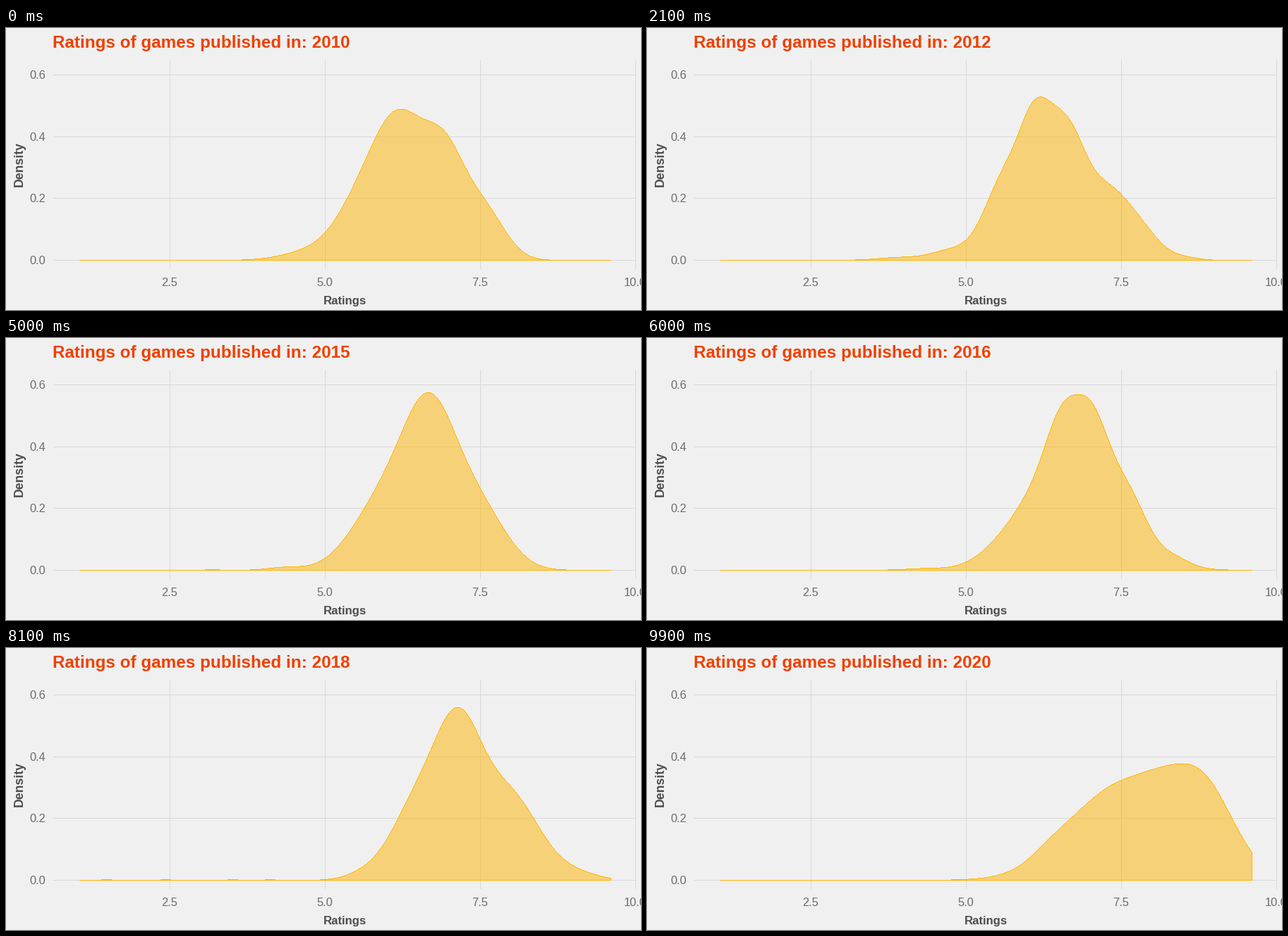
Animation, 900 px wide and 400 px high, one loop 10 s. Source, as a matplotlib script:

```python
import numpy as np
import matplotlib.pyplot as plt
from matplotlib.animation import FuncAnimation
from matplotlib.patches import Polygon

W, H, DPI = 900, 400, 100
FRAMES, INTERVAL = 100, 100
BG, GRID, AMBER = "#f0f0f0", "#d8d8d8", "#ffb400"
TITLE, TICK, LABEL = "#f04000", "#6c6c6c", "#4d4d4d"
ZERO, LEFT, RIGHT = 329, 104, 857
X = np.arange(LEFT, RIGHT + 1)


def bells(*parts):
    """Sum of normal bells, each (height, centre, spread) in pixels."""
    return sum(a * np.exp(-((X - c) / s) ** 2 / 2) for a, c, s in parts)


# Density curves and the frames at which they stand
KEYS = {
    0: bells((199, 556, 40), (122, 624, 29), (63, 679, 29), (47, 492, 33),
             (12, 430, 38)),
    21: bells((160, 550, 23), (160, 594, 26), (108, 505, 28), (96, 655, 34),
              (20, 708, 24), (14, 432, 28), (4, 360, 32), (4, 760, 20)),
    34: bells((205, 594, 46), (92, 519, 40), (43, 690, 36), (9, 430, 28),
              (1.6, 335, 29)),
    50: bells((210, 601, 38), (92, 533, 44), (78, 672, 38), (4, 395, 24),
              (0.8, 292, 9.8)),
    70: bells((150, 616, 65), (115, 632, 23), (70, 585, 20), (50, 686, 21),
              (14, 752, 20), (0.8, 365, 37)),
    81: bells((178, 640, 32), (122, 710, 45), (105, 582, 37), (7, 815, 28),
              (7, 505, 25), *[(0.77, x, 7) for x in (142, 226, 321, 374)]),
    89: bells((180, 660, 48), (90, 752, 42), (30, 570, 35)),
    99: bells((134, 672, 72), (115, 787, 45), (13, 722, 30), (10, 572, 28)),
}
TIMES = list(KEYS)


def heights(i):
    k = min(np.searchsorted(TIMES, i, side="right"), len(TIMES) - 1)
    t0, t1 = TIMES[k - 1], TIMES[k]
    return KEYS[t0] + (KEYS[t1] - KEYS[t0]) * (i - t0) / (t1 - t0)


def columns(top, bottom):
    """Outline of one-pixel columns running from top to bottom."""
    xs = np.repeat(np.r_[X, RIGHT + 1], 2)[1:-1]
    ys = np.r_[np.repeat(top, 2), np.repeat(bottom, 2)[::-1]]
    return np.c_[np.r_[xs, xs[::-1]], ys]


fig = plt.figure(figsize=(W / DPI, H / DPI), dpi=DPI, facecolor=BG)
ax = fig.add_axes([0, 0, 1, 1])
ax.set_xlim(0, W)
ax.set_ylim(H, 0)
ax.axis("off")


def stroke(xs, ys, color, z):
    ax.plot(xs, ys, color=color, lw=72 / DPI, snap=False,
            solid_capstyle="butt", zorder=z)


def shape(z, **kw):
    return ax.add_patch(Polygon([(0, 0), (1, 1), (2, 0)], facecolor=AMBER,
                                edgecolor="none", snap=False, zorder=z, **kw))


def label(x, y, s, px, color, **kw):
    return ax.text(x, y, s, fontsize=px * 72 / DPI, color=color,
                   family="Liberation Sans", va="baseline", **kw)


for n, y in enumerate((329, 241, 154, 66)):
    stroke([67, 893], [y + 0.5] * 2, GRID, 1)
    label(56, y + 6, f"{n * 0.2:.1f}", 16.4, TICK, ha="right")
for n in range(4):
    x = 232 + 220 * n
    stroke([x + 0.5] * 2, [45, 342], GRID, 1)
    label(x, 366, f"{2.5 * (n + 1):.1f}", 16.4, TICK, ha="center")

label(480.5, 392, "Ratings", 16.8, LABEL, ha="center", weight="bold")
label(24, 193, "Density", 17.6, LABEL, ha="center", weight="bold",
      rotation=90, rotation_mode="anchor")
title = label(66, 28, "", 24.2, TITLE, ha="left", weight="bold")

area = shape(2, alpha=0.5)
edge = shape(3)
stroke([LEFT, RIGHT + 1], [ZERO + 0.5] * 2, AMBER, 4)


def update(i):
    h = heights(i)
    sides = np.r_[h[0], (h[1:] + h[:-1]) / 2, 0]
    high = np.maximum(sides[1:], sides[:-1])
    low = np.minimum(sides[1:], sides[:-1])
    top = np.round(ZERO - high)
    area.set_xy(columns(top, np.full_like(top, ZERO + 1)))
    edge.set_xy(columns(top, np.maximum(top + 1, np.round(ZERO - low))))
    year = round(2010 + 10 * i / (FRAMES - 1))
    title.set_text(f"Ratings of games published in: {year}")
    return area, edge, title


anim = FuncAnimation(fig, update, frames=FRAMES, interval=INTERVAL,
                     repeat=True, repeat_delay=0, blit=False)
plt.show()
```
